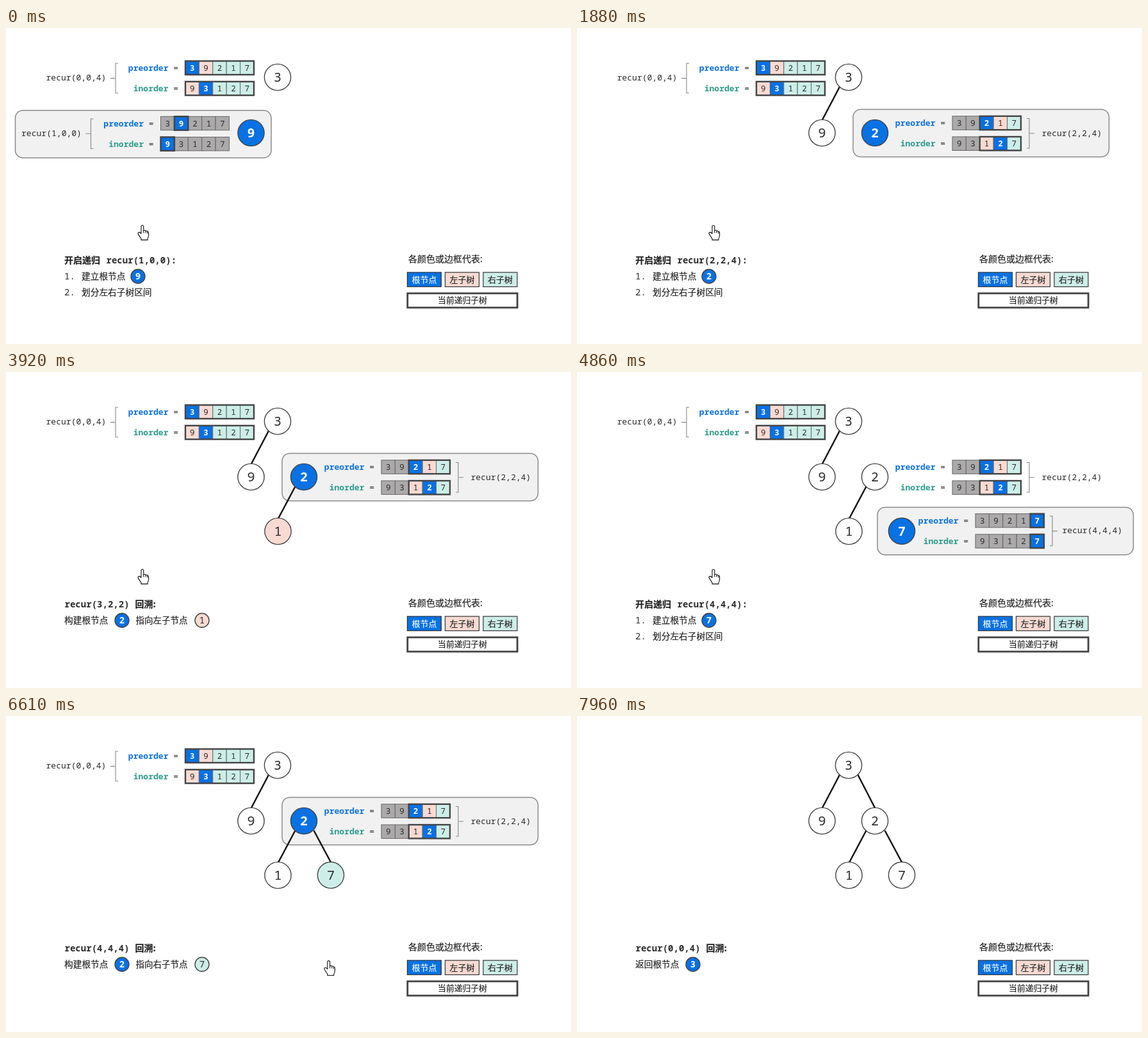
These frames come from a looping animation (882x494 px, 8000 ms). An HTML page:

```html
<!DOCTYPE html>
<html lang="zh-CN">
<head>
<meta charset="utf-8">
<title>Rebuilding a binary tree</title>
<style>
  html, body { margin: 0; width: 100%; height: 100%; overflow: hidden; background: #fff; }
  svg { display: block; }
  text { font-family: "Noto Sans Mono", "Noto Sans CJK SC", monospace; fill: #2b2b2b; }
  .cjk {
    font-family: "Noto Sans CJK SC", "Noto Sans CJK", sans-serif;
    color: #222; fill: currentColor; stroke: currentColor; stroke-width: .2;
  }
</style>
</head>
<body>
<svg width="882" height="494" viewBox="0 0 882 494">
  <g id="scene"></g>
  <g id="legend"></g>
  <g id="cursor" stroke="#111" stroke-width="1.1" stroke-linejoin="round">
    <path fill="#fff" d="M-2 1.5Q-2 -.5 -.1 -.5T1.8 1.5V7.6Q3.9 6.6 5 8.2Q7 7.4 7.8 9.2Q9.6 8.8 9.6 11.4V15.5Q9.6 18 8 20V22.4H-2V20.2Q-4 17.5 -6.6 13.4Q-7.6 11 -5.6 10.4Q-3.8 10 -2 12.6Z"/>
    <path fill="none" d="M1.8 7.6V11.5M5 8.2V11.5M7.8 9.2V12.5"/>
  </g>
</svg>
<script>
const LOOP = 8000;
const BLUE = '#0871e3', PINK = '#f9dad3', MINT = '#cdeee8', GRAY = '#aba9a9', DARK = '#444';
const FILL = { b: BLUE, l: PINK, r: MINT, g: GRAY };
const CELL = 21.4;

// Call i creates node i. b: root, l: left subtree, r: right subtree, g: outside.
const calls = [
  { args: '0,0,4', x: 280, y: 62.3, pre: 'blrrr', ino: 'lbrrr', panel: [54.5, 40.8], label: 62.5 },
  { args: '1,0,0', x: 241.5, y: 149, pre: 'gbggg', ino: 'bgggg', panel: [14.5, 128.7], label: 24 },
  { args: '2,2,4', x: 586, y: 148.5, pre: 'ggblr', ino: 'gglbr', panel: [431, 127.2], label: 725.5, right: true },
  { args: '3,2,2', x: 282, y: 233.3, pre: 'gggbg', ino: 'ggbgg', panel: [55.5, 212.2], label: 64.5 },
  { args: '4,4,4', x: 622, y: 232.3, pre: 'ggggb', ino: 'ggggb', panel: [469, 211.5], label: 757.5, right: true },
];
const nodes = [[3, 424, 77], [9, 382.5, 164], [2, 465, 164], [1, 424.5, 249], [7, 507, 248.8]];
const edges = ['M410 92L383 143.5', 'M451.5 179L425 229', 'M480.5 179L507 228.5', 'M438.5 92L465 143.5'];

const steps = [
  { at: 0, tables: [0, 1], nodes: 2, edges: 0, enter: 1 },
  { at: 860, tables: [0], nodes: 2, edges: 1, back: 1, root: 0 },
  { at: 1880, tables: [0, 2], nodes: 3, edges: 1, enter: 2 },
  { at: 2860, tables: [0, 2, 3], nodes: 4, edges: 1, enter: 3 },
  { at: 3880, tables: [0, 2], nodes: 4, edges: 2, back: 3, root: 2 },
  { at: 4860, tables: [0, 2, 4], nodes: 5, edges: 2, enter: 4 },
  { at: 5880, tables: [0, 2], nodes: 5, edges: 3, back: 4, root: 2 },
  { at: 6880, tables: [0], nodes: 5, edges: 4, back: 2, root: 0 },
  { at: 7880, tables: [], nodes: 5, edges: 4, back: 0 },
];

// time, x, y of the fingertip
const track = [
  [0, 213, 309], [6330, 213, 309], [6610, 503, 383], [6940, 775, 412],
  [7180, 775, 412], [7430, 783.5, 401], [7960, 841, 497], [LOOP, 841, 497],
];

const text = (s, x, cy, size, attrs = '') =>
  `<text x="${x}" y="${cy + size * 0.36}" font-size="${size}" ${attrs}>${s}</text>`;
const cjk = (s, x, cy, size = 13.7, attrs = '') => text(s, x, cy, size, 'class="cjk" ' + attrs);
const rect = (x, y, w, h, fill, stroke, width, rx = 0) =>
  `<rect x="${x}" y="${y}" width="${w}" height="${h}" rx="${rx}" fill="${fill}" stroke="${stroke}" stroke-width="${width}"/>`;
const path = (d, stroke, width) => `<path d="${d}" fill="none" stroke="${stroke}" stroke-width="${width}"/>`;
const centred = fill => 'text-anchor="middle"' + (fill === BLUE ? ' font-weight="700" style="fill:#fff"' : '');

const disc = (value, x, y, r, size, fill) =>
  `<circle cx="${x}" cy="${y}" r="${r}" fill="${fill}" stroke="${DARK}" stroke-width="1.4"/>` +
  text(value, x, y, size, centred(fill));

function row(name, colour, values, kinds, x, y) {
  const top = y - CELL / 2;
  const first = kinds.search(/[^g]/), count = kinds.replace(/g/g, '').length;
  const cells = [...kinds].map((kind, i) =>
    rect(x + i * CELL, top, CELL, CELL, FILL[kind], '#666', 1) +
    text(values[i], x + (i + 0.5) * CELL, y, 12.5, centred(FILL[kind])));
  return text(name, x - 26.5, y, 13.05, `text-anchor="end" font-weight="700" style="fill:${colour}"`) +
    text('=', x - 18.8, y, 13.05) + cells.join('') +
    rect(x + first * CELL, top, count * CELL, CELL, 'none', DARK, 2.4);
}

function table({ args, x, y, pre, ino, label, right }) {
  const side = right ? 1 : -1, bar = x + (right ? 120 : -109), mid = y + 16.3;
  const hook = bar - side * 4;
  return row('preorder', '#0a70dc', '39217', pre, x, y) +
    row('inorder', '#2b9c8c', '93127', ino, x, y + 32.2) +
    path(`M${hook} ${y - 7}H${bar}V${y + 39.5}H${hook}M${bar} ${mid}h${side * 8}`, '#888', 1.1) +
    text(`recur(${args})`, label, mid - 0.8, 13.05);
}

function caption({ enter, back, root }) {
  const call = `recur(${calls[enter ?? back].args})`;
  const badge = (i, x, fill) => disc(nodes[i][0], x, 388.3, 11, 14, fill);
  const bold = 'font-weight="700"';
  if (enter !== undefined) {
    return cjk('开启递归', 91, 363, 14, bold) + text(call + ':', 156.5, 363, 14.05, bold) +
      text('1.', 91, 388.3, 14) + cjk('建立根节点', 118, 388.3) + badge(enter, 206, BLUE) +
      text('2.', 91, 413, 14) + cjk('划分左右子树区间', 118, 413);
  }
  const head = text(call, 91.5, 363, 14.05, bold) + cjk('回溯:', 201.5, 363, 14, bold);
  if (root === undefined) return head + cjk('返回根节点', 91, 388.3) + badge(back, 181, BLUE);
  const right = calls[back].right;
  return head + cjk('构建根节点', 91, 388.3) + badge(root, 181, BLUE) +
    cjk(`指向${right ? '右' : '左'}子节点`, 202.5, 388.3, 13.5) + badge(back, 306, right ? MINT : PINK);
}

function scene(step) {
  const active = step.enter ?? step.root;
  const nodeFill = i => i === active ? BLUE
    : i === step.back && active !== undefined ? (calls[i].right ? MINT : PINK) : '#fff';
  const panel = active === undefined ? ''
    : rect(...calls[active].panel, 399.5, 74.3, '#f1f1f1', '#8a8a8a', 1.5, 12);
  return panel + step.tables.map(i => table(calls[i])).join('') +
    edges.slice(0, step.edges).map(d => path(d, '#151515', 2.5)).join('') +
    nodes.slice(0, step.nodes).map(([v, x, y], i) => disc(v, x, y, 20.6, 20, nodeFill(i))).join('') +
    caption(step);
}

const byId = id => document.getElementById(id);
const swatch = (s, x, fill, w = 53) =>
  rect(x, 382, w, 22.5, fill, '#333', 1.2) +
  cjk(s, x + w / 2, 393, 13, 'text-anchor="middle"' + (fill === BLUE ? ' style="color:#fff"' : ''));
byId('legend').innerHTML = cjk('各颜色或边框代表:', 628, 361, 14) +
  swatch('根节点', 626.5, BLUE) + swatch('左子树', 685.5, PINK) + swatch('右子树', 745, MINT) +
  rect(626.8, 414.8, 171.4, 22.3, '#fff', DARK, 2.8) +
  cjk('当前递归子树', 712.5, 425.8, 12.8, 'text-anchor="middle"');

let shown;
function draw(now) {
  const t = now % LOOP;
  const step = steps.findLast(s => s.at <= t);
  if (step !== shown) byId('scene').innerHTML = scene(shown = step);

  const i = track.findLastIndex(k => k[0] <= t);
  const [t0, x0, y0] = track[i], [t1, x1, y1] = track[i + 1];
  const p = (t - t0) / (t1 - t0);
  byId('cursor').setAttribute('transform', `translate(${x0 + (x1 - x0) * p} ${y0 + (y1 - y0) * p})`);
  requestAnimationFrame(draw);
}
draw(performance.now());
</script>
</body>
</html>
```
